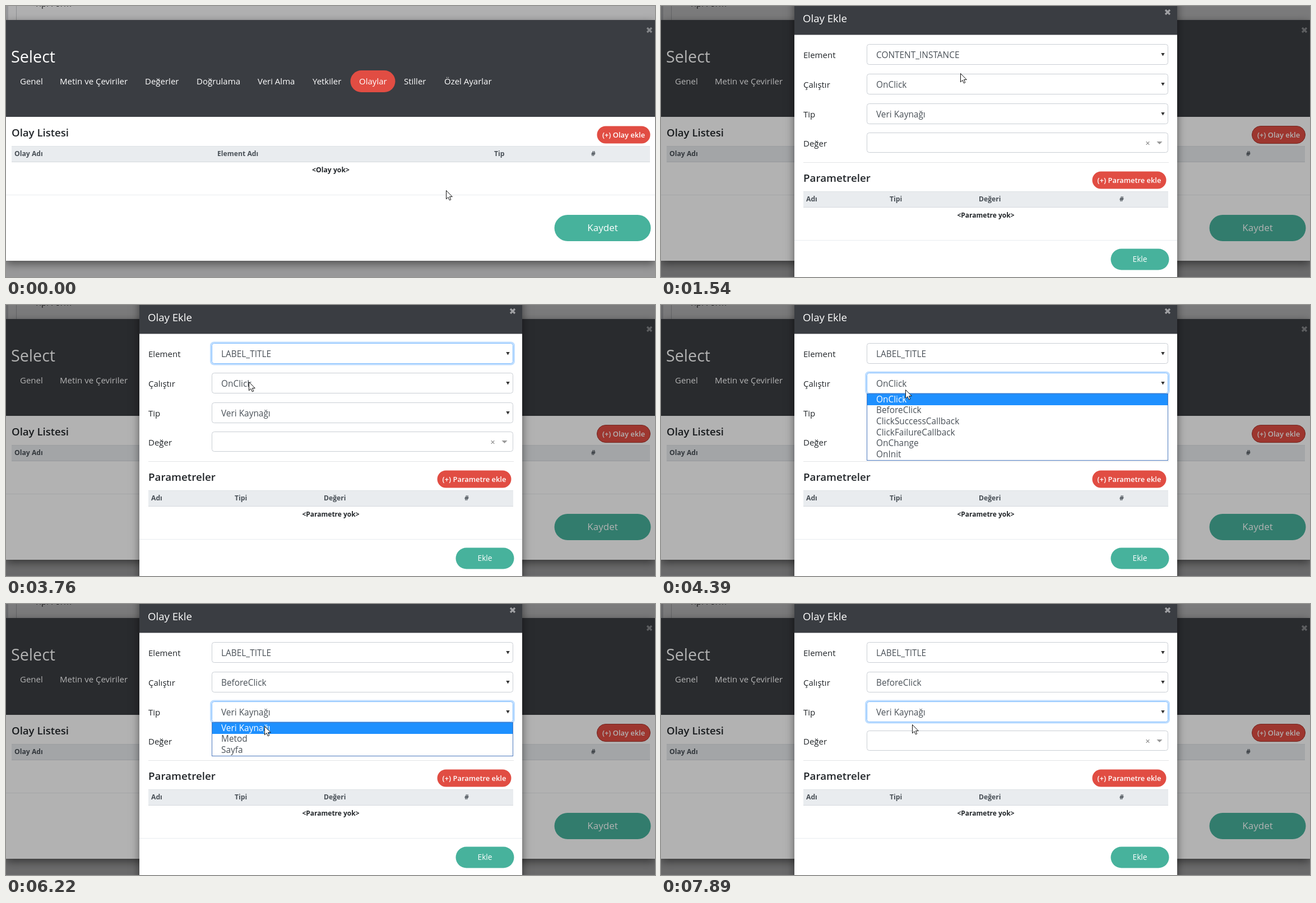
Animation of 1158x484 px, one loop 7990 ms. Source, as an HTML page with a canvas:

```html
<!DOCTYPE html>
<html lang="tr">
<head>
<meta charset="utf-8">
<title>Olay Ekle</title>
<style>
html, body { margin: 0; width: 100%; height: 100%; overflow: hidden; background: #999; }
canvas { display: block; width: 1158px; height: 484px; }
</style>
</head>
<body>
<canvas id="stage" width="1158" height="484"></canvas>
<script>
const ctx = document.getElementById('stage').getContext('2d');
const LOOP = 7990, STEP = 100, START = 20, POPUP = 790;
const RED = '#e14d43', GREEN = '#47b29c', DARK = '#3a3d42', INK = '#212529', GREY = '#495057';
const ROW = 19.7;

// Pointer stops: time, x, y
const stops = [
  [20, 785, 329], [620, 1095, 220], [1020, 1095, 225], [1320, 728, 262],
  [1520, 534, 120], [1920, 484, 92], [2120, 480, 94], [2520, 470, 150],
  [2720, 470, 150], [3120, 452, 136], [3720, 433, 137], [4120, 435, 142],
  [4920, 441, 200], [5420, 446, 186], [6220, 461, 218], [6620, 458, 238],
  [7020, 452, 200], [7420, 448, 215]
];

const selects = [
  { label: 'Element', items: ['CONTENT_INSTANCE', 'LABEL_TITLE', 'CHOSEN_ELEMENT'] },
  { label: 'Çalıştır', items: ['OnClick', 'BeforeClick', 'ClickSuccessCallback',
    'ClickFailureCallback', 'OnChange', 'OnInit'] },
  { label: 'Tip', items: ['Veri Kaynağı', 'Metod', 'Sayfa'] }
];
selects.forEach((s, i) => s.y = 68 + 53 * i);

// Each use of a list: which one, when it opens and closes, what is chosen
const uses = [
  { of: selects[0], open: 2020, close: 3420, pick: 1 },
  { of: selects[1], open: 4220, close: 5420, pick: 1 },
  { of: selects[2], open: 5920, close: 6720, pick: 1 },
  { of: selects[2], open: 7120, close: 7520, pick: 0 }
];

const tabs = [['Genel', 25], ['Metin ve Çeviriler', 96], ['Değerler', 248],
  ['Doğrulama', 340], ['Veri Alma', 449], ['Yetkiler', 547],
  ['Olaylar', 630], ['Stiller', 710], ['Özel Ayarlar', 782]];

const clamp = v => Math.max(0, Math.min(1, v));
const smooth = k => k * k * (3 - 2 * k);
const snap = t => Math.max(0, Math.floor((t - START) / STEP) * STEP + START);

function pointerAt(t) {
  let i = 0;
  while (i < stops.length - 2 && stops[i + 1][0] <= t) i++;
  const [t0, x0, y0] = stops[i], [t1, x1, y1] = stops[i + 1];
  const k = smooth(clamp((t - t0) / (t1 - t0)));
  return [Math.round(x0 + (x1 - x0) * k), Math.round(y0 + (y1 - y0) * k)];
}

function chosen(s, t) {
  const last = uses.filter(u => u.of === s && u.close <= t).pop();
  return last ? last.pick : 0;
}

function text(str, x, y, size, color = INK, weight = 400, align = 'left') {
  ctx.font = `${weight} ${size}px "Open Sans", "Noto Sans", sans-serif`;
  ctx.textAlign = align;
  ctx.fillStyle = color;
  ctx.fillText(str, x, y);
}

function rect(x, y, w, h, color) {
  ctx.fillStyle = color;
  ctx.fillRect(x, y, w, h);
}

function panel(x, y, w, h) {
  ctx.save();
  ctx.shadowColor = 'rgba(0,0,0,.5)';
  ctx.shadowBlur = 15;
  ctx.shadowOffsetY = 5;
  rect(x, y, w, h, '#fff');
  ctx.restore();
}

function round(x, y, w, h, r, fill, stroke, line = 1) {
  ctx.beginPath();
  ctx.roundRect(x, y, w, h, r);
  if (fill) { ctx.fillStyle = fill; ctx.fill(); }
  if (stroke) { ctx.strokeStyle = stroke; ctx.lineWidth = line; ctx.stroke(); }
}

function pill(x, y, w, h, color, label, base, size, weight, edge) {
  round(x, y, w, h, h / 2, color, edge);
  text(label, x + w / 2, base, size, '#fff', weight, 'center');
}

function cross(x, y, r, color, line) {
  ctx.strokeStyle = color;
  ctx.lineWidth = line;
  ctx.beginPath();
  ctx.moveTo(x - r, y - r); ctx.lineTo(x + r, y + r);
  ctx.moveTo(x + r, y - r); ctx.lineTo(x - r, y + r);
  ctx.stroke();
}

function triangle(x, y, half, h, color) {
  ctx.fillStyle = color;
  ctx.beginPath();
  ctx.moveTo(x - half, y); ctx.lineTo(x + half, y); ctx.lineTo(x, y + h);
  ctx.fill();
}

function tableHead(x, y, w, base, cells) {
  rect(x, y, w, 29, '#e9ecef');
  rect(x, y, w, 1, '#dee2e6');
  rect(x, y + 28, w, 1, '#d5d9dd');
  for (const [label, cx] of cells) text(label, cx, base, 12.2, GREY, 700);
}

function drawPage(hover, pressed) {
  rect(0, 0, 1158, 240, '#b0b0b1');
  rect(0, 240, 1158, 244, '#99999a');
  rect(0, 0, 4, 25, '#97989b');
  rect(18, 0, 1, 25, '#8e8f91');
  text('Tipi Form', 51, 1, 15, '#1b1c1e');

  panel(0, 25, 1158, 430);
  rect(0, 25, 1158, 173, DARK);
  cross(1148, 43, 4, '#85878a', 3.2);
  text('Select', 9, 101, 28.7, '#fff');
  round(614.5, 115, 80, 39, 19.5, RED);
  for (const [label, x] of tabs) text(label, x, 140, 15, '#fff');

  text('Olay Listesi', 10, 233, 18.6, INK, 600);
  pill(1054.5, 214.5, 95, 31, hover ? '#d8443a' : RED, '(+) Olay ekle', 234.5, 12.9, 600,
    pressed && '#a5362e');
  tableHead(10, 250, 1139, 268,
    [['Olay Adı', 15], ['Element Adı', 377], ['Tip', 871], ['#', 1044]]);
  text('<Olay yok>', 579.5, 297, 12.2, INK, 700, 'center');
  rect(0, 337, 1158, 1, '#e9ecef');
  pill(978.5, 373, 172, 47, GREEN, 'Kaydet', 402, 17, 400);
}

function drawSelect(s, t, focused) {
  text(s.label, 254, s.y + 24.5, 15);
  if (focused) round(365.5, s.y - 1, 541, 39, 5.5, null, '#bfdeff', 3);
  round(367.5, s.y + 0.5, 537, 36, 4, '#fff', focused ? '#80bdff' : '#c9ced4');
  text(s.items[chosen(s, t)], 384, s.y + 24.5, 15.4, GREY);
  triangle(895.5, s.y + 16, 3.2, 5.5, '#333');
}

function drawList(s, t, py) {
  const top = s.y + 37, n = s.items.length;
  const h = Math.round(n * ROW) + 2;
  rect(367, top, 538, h, '#fff');
  const over = Math.floor((py - top) / ROW);
  const active = over < 0 ? chosen(s, t) : Math.min(over, n - 1);
  rect(368, Math.round(top + 0.7 + active * ROW), 536, 20, '#1e90ff');
  s.items.forEach((item, i) =>
    text(item, 384, top + 15.5 + i * ROW, 15.4, i === active ? '#fff' : GREY));
  ctx.strokeStyle = '#4a78bd';
  ctx.lineWidth = 1;
  ctx.strokeRect(367.5, top + 0.5, 537, h - 1);
}

function drawDialog(t, py) {
  panel(238, -60, 683, 604);
  rect(238, -60, 683, 111.5, DARK);
  text('Olay Ekle', 253, 29, 18.6, '#fff');
  cross(904, 11, 4, '#a0a1a4', 3.2);

  const focus = uses.filter(u => t >= u.open - STEP).pop();
  for (const s of selects) drawSelect(s, t, focus && s === focus.of);

  text('Değer', 254, 251, 15);
  round(367.5, 226.5, 537, 35, 4, '#fff', '#c9ced4');
  cross(868.5, 245, 2.8, '#8a8a8a', 1.2);
  triangle(889.5, 242, 5, 5, '#999');
  rect(254, 279, 652, 1, '#e3e4e6');

  text('Parametreler', 254, 314, 18.8, INK, 600);
  pill(769.5, 295.5, 132, 31, RED, '(+) Parametre ekle', 315.5, 12.9, 600);
  tableHead(254, 331, 651, 349,
    [['Adı', 259], ['Tipi', 408], ['Değeri', 567], ['#', 818]]);
  text('<Parametre yok>', 579.5, 378, 12, INK, 700, 'center');
  rect(238, 418, 683, 1, '#e9ecef');
  pill(802.5, 433.5, 104, 38, GREEN, 'Ekle', 457, 13.7, 400);

  for (const u of uses) if (t >= u.open && t < u.close) drawList(u.of, t, py);
}

const arrow = new Path2D('M.5 .5V15.8L4 12.5L6.3 17.8L8.8 16.8L6.5 11.6H11.3Z');
const hand = new Path2D('M-1.5 1Q0-1 1.5 1V7L8 8.5Q10 9 10 11V15L8 20H-2L-7 12Q-7 9-4 10L-1.5 12Z');

function drawPointer(x, y, shape) {
  ctx.save();
  ctx.translate(x, y);
  ctx.fillStyle = '#fff';
  ctx.strokeStyle = '#111';
  ctx.lineWidth = 1;
  ctx.fill(shape);
  ctx.stroke(shape);
  ctx.restore();
}

function draw(time) {
  const t = snap(time);
  const [x, y] = pointerAt(t);
  const hover = x >= 1055 && y >= 215 && y < 245;
  const shade = clamp((t - POPUP) / 150);
  const show = clamp((t - POPUP) / 300);

  drawPage(hover, shade > 0);
  rect(0, 0, 1158, 484, `rgba(0,0,0,${0.3 * shade})`);
  if (show > 0) {
    ctx.save();
    ctx.globalAlpha = show;
    ctx.translate(0, -50 * (1 - show) ** 2);
    drawDialog(t, y);
    ctx.restore();
  }
  drawPointer(x, y, hover ? hand : arrow);
}

const begin = performance.now();
function tick() {
  draw((performance.now() - begin) % LOOP);
  requestAnimationFrame(tick);
}
tick();
</script>
</body>
</html>
```
